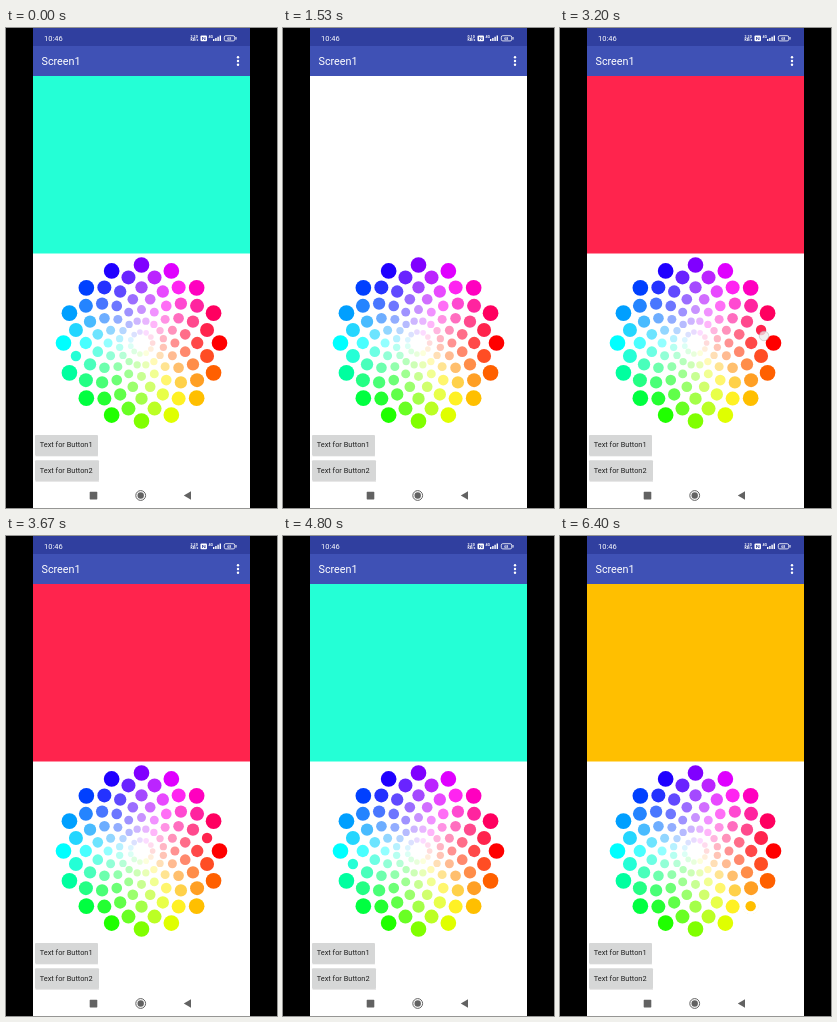
These frames come from a looping animation (271x480 px, 6.47 s). An HTML page:

```html
<!DOCTYPE html>
<html lang="en">
<head>
<meta charset="utf-8">
<title>Color wheel</title>
<style>
  html, body { margin: 0; width: 100%; height: 100%; overflow: hidden; background: #000; }
  svg { display: block; width: 100vw; height: 100vh; }
  text { font-family: Roboto, sans-serif; }
  .light { fill: #fff; }
  .button rect { fill: #d6d7d7; }
  .button text { font-size: 7.4px; fill: #222; }
  .tiny { font-size: 3.6px; font-weight: 700; }
</style>
</head>
<body>
<svg viewBox="0 0 271 480">
  <rect width="271" height="480"/>
  <rect x="27" width="217" height="480" fill="#fff"/>
  <rect x="27" width="217" height="18" fill="#303f9f"/>
  <rect x="27" y="18" width="217" height="30" fill="#3f51b5"/>
  <rect id="panel" x="27" y="48" width="217" height="177.5"/>

  <g class="light">
    <text x="38" y="13" font-size="7.5">10:46</text>
    <text x="35.5" y="37" font-size="10.8">Screen1</text>
    <text id="speed" class="tiny" x="184.5" y="10">2.20</text>
    <text class="tiny" x="184.5" y="13.4">KB/s</text>
    <rect x="194.5" y="7.5" width="6.5" height="5.8" rx="1"/>
    <path d="M196.5 12V9L199 12V9" fill="none" stroke="#303f9f" stroke-width=".8"/>
    <text class="tiny" x="202.5" y="10">4G</text>
    <path d="M207 13V11h1.4v2zM209.2 13v-3h1.4v3zM211.4 13V8.8h1.4V13zM213.6 13V7.5h1.4V13z"/>
    <rect x="218.3" y="7.7" width="10.4" height="5.2" rx="1.5" fill="none" stroke="#fff" stroke-width=".8"/>
    <rect x="229.5" y="9" width="1" height="2.6"/>
    <text class="tiny" x="221.3" y="11.7">68</text>
    <circle cx="232" cy="29.3" r="1.2"/>
    <circle cx="232" cy="33" r="1.2"/>
    <circle cx="232" cy="36.7" r="1.2"/>
  </g>

  <g id="wheel"></g>
  <g id="selector"><circle r="8.4" fill="#fff"/><circle id="core" r="5.2"/></g>
  <circle id="touch" r="4.8" fill="#eee" fill-opacity=".75" stroke="#aaa" stroke-opacity=".6" stroke-width=".8"/>

  <g class="button">
    <rect x="29" y="407" width="63" height="20.5" rx="1"/>
    <text x="33.7" y="419.4">Text for Button1</text>
    <rect x="29" y="432.3" width="64" height="20.5" rx="1"/>
    <text x="33.7" y="444.9">Text for Button2</text>
  </g>
  <path d="M29.5 427.8h62.5M29.5 453.1h63.5" stroke="#bbb" stroke-width=".6"/>
  <g fill="#626262">
    <rect x="83.7" y="463.8" width="7.6" height="7.6" rx=".6"/>
    <circle cx="134.7" cy="467.5" r="4.9" fill="none" stroke="#626262"/>
    <circle cx="134.7" cy="467.5" r="3.2"/>
    <path d="M177.8 467.5L185 463.2V471.8Z"/>
  </g>
</svg>
<script>
  const LOOP = 6470, RINGS = 7, REACH = 78, CENTER = { x: 135.5, y: 315 };
  const GAP = REACH / RINGS;
  const byId = id => document.getElementById(id);

  const place = (ring, degrees) => {
    const a = degrees * Math.PI / 180;
    return { x: CENTER.x + ring * GAP * Math.cos(a), y: CENTER.y + ring * GAP * Math.sin(a) };
  };
  const tint = (ring, degrees) => `hsl(${degrees} 100% ${100 - 50 * ring / RINGS}%)`;

  function buildWheel() {
    for (let ring = 1; ring <= RINGS; ring++) {
      const size = GAP / 2 * (1 + 0.15 * (ring - 4));
      const fit = 0.975 * Math.PI / Math.asin(size / (ring * GAP));
      const count = Math.min(16, Math.floor(fit + 0.5));
      for (let i = 0; i < count; i++) {
        const degrees = 360 * (i + (ring % 2 ? 0 : 0.5)) / count;
        const p = place(ring, degrees);
        const dot = document.createElementNS('http://www.w3.org/2000/svg', 'circle');
        dot.setAttribute('cx', p.x);
        dot.setAttribute('cy', p.y);
        dot.setAttribute('r', size - 0.25);
        dot.setAttribute('fill', tint(ring, degrees));
        byId('wheel').append(dot);
      }
    }
  }

  // Each pick: start, ring, hue, touch end, touch offset from the dot
  const picks = [
    [0, 6, 168.75, 0, 0, 0],
    [70, 0, 0, 0, 0, 0],
    [1870, 5, 135, 2200, 3, 4],
    [2870, 6, 348.75, 3330, 3, 6],
    [3870, 7, 225, 4330, 8, 7],
    [4530, 6, 168.75, 4730, 4, 4],
    [6000, 7, 45, 6330, 3, 4]
  ];

  function render(t) {
    const [, ring, hue, touchEnd, dx, dy] = picks.findLast(pick => pick[0] <= t);
    const p = place(ring, hue), color = tint(ring, hue);
    byId('panel').setAttribute('fill', color);
    byId('core').setAttribute('fill', color);
    byId('selector').setAttribute('transform', `translate(${p.x} ${p.y})`);
    byId('selector').setAttribute('visibility', ring ? 'visible' : 'hidden');
    byId('touch').setAttribute('transform', `translate(${p.x + dx} ${p.y + dy})`);
    byId('touch').setAttribute('visibility', t < touchEnd ? 'visible' : 'hidden');
    byId('speed').textContent = t >= 70 && t < 1870 ? '0.10' : '2.20';
  }

  buildWheel();
  const start = performance.now();
  const tick = () => {
    render((performance.now() - start) % LOOP);
    requestAnimationFrame(tick);
  };
  tick();
</script>
</body>
</html>
```
